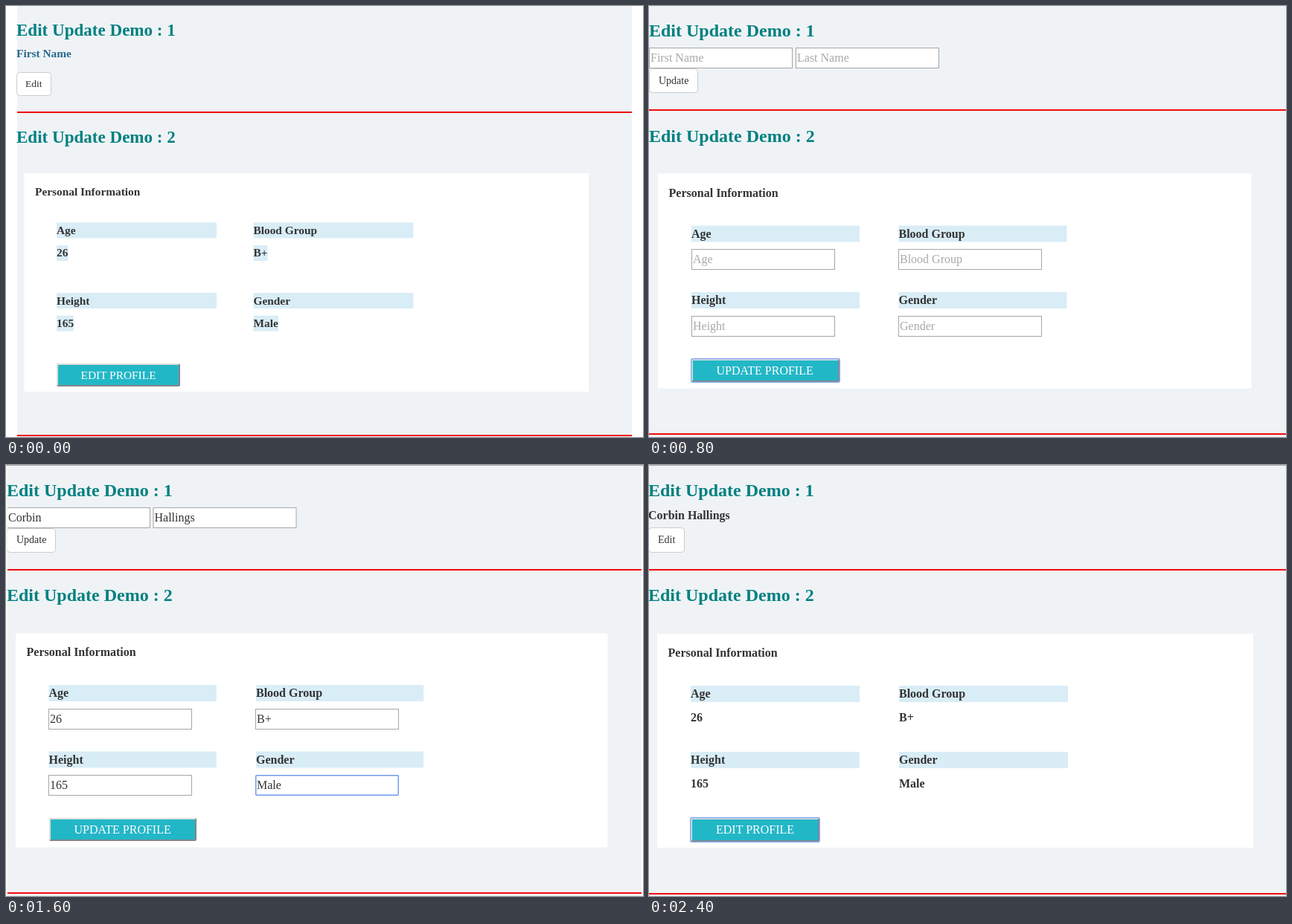
An HTML page for the animation above (3.2 s loop, 856 px wide and 580 px high).

```html
<!DOCTYPE html>
<html lang="en">
<head>
<meta charset="utf-8">
<title>Edit and update demo</title>
<style>
  html, body { margin: 0; width: 100%; height: 100%; overflow: hidden; background: #fff; }
  svg { display: block; width: 856px; height: 580px; font-family: "Liberation Serif", "Times New Roman", serif; }
  text { fill: #333; white-space: pre; }
  .b { font-weight: bold; }
  .head { font-weight: bold; fill: teal; }
  .name { font-weight: bold; fill: #286a8e; }
  .hint { fill: #a9a9a9; }
  .light { fill: #fff; }
  .scene {
    visibility: hidden;
    animation: show 3200ms step-end infinite;
    animation-delay: calc(var(--i) * 800ms - 3200ms);
  }
  @keyframes show {
    0% { visibility: visible; }
    25%, 100% { visibility: hidden; }
  }
</style>
</head>
<body>
<svg id="stage" viewBox="0 0 856 580"></svg>
<script>
const BG = '#eff3f6', BAR = '#d9edf7', RED = '#f10a0f';
const FIRST = 'Corbin', LAST = 'Hallings';
const LABELS = ['Age', 'Blood Group', 'Height', 'Gender'];
const VALUES = ['26', 'B+', '165', 'Male'];

const rect = (x, y, w, h, fill, extra = '') =>
  `<rect x="${x}" y="${y}" width="${w}" height="${h}" fill="${fill}" ${extra}/>`;
const text = (x, y, str, size = 16, cls = '') =>
  `<text x="${x}" y="${y}" font-size="${size}" class="${cls}">${str}</text>`;
const outline = (x, y, w, h, color, r = 0) =>
  rect(x + .5, y + .5, w - 1, h - 1, '#fff', `stroke="${color}" rx="${r}"`);

function input(x, y, str, cls, w = 193, focused) {
  const ring = focused ? rect(x + .75, y + .75, w - 1.5, 26.5, '#fff', 'stroke="#6f9bea" stroke-width="1.5" rx="1"')
                       : outline(x, y, w, 28, '#a6a6a6');
  return ring + text(x + 2, y + 19, str, 16, cls);
}

// Raised button with lit top-left and shaded bottom-right edges
function button(x, y, w, h, str, tx, size, focused) {
  const r = x + w, b = y + h;
  return rect(x, y, w, h, '#858585', 'rx="2"') +
    `<path d="M${x} ${b - 1}V${y + 1}Q${x} ${y} ${x + 1} ${y}H${r - 1}L${r - 2} ${y + 2}H${x + 2}V${b - 2}Z" fill="#dedede"/>` +
    rect(x + 2, y + 2, w - 4, h - 4, '#22b7c7') +
    (focused ? rect(x - .25, y - .25, w + .5, h + .5, 'none', 'stroke="#84a9ee" stroke-width="1.5" rx="2"') : '') +
    text(tx, y + h / 2 + 5.2, str, size, 'light');
}

function page(s, i) {
  const k = s.k || 1, size = 16 * k;
  const [cx, cy, cw, ch] = s.card;
  let out = rect(s.left, 0, s.right - s.left, 580, BG);
  if (s.topLine) out += rect(0, 0, 856, 1, '#a4a8aa');
  out += text(s.x, s.head[0], 'Edit Update Demo : 1', 24 * k, 'head') +
         text(s.x, s.head[1], 'Edit Update Demo : 2', 24 * k, 'head') +
         s.top();
  for (const y of s.lines) out += rect(s.left, y, s.right - s.left, 2, RED);
  out += rect(cx, cy, cw, ch, '#fff') +
         text(cx + 14.6, s.title, 'Personal Information', size, 'b');
  LABELS.forEach((label, n) => {
    const x = s.cols[n % 2], y = s.rows[n >> 1];
    out += rect(x, y, s.barW, s.barH, BAR) +
           text(x, y + s.barH / 2 + 5.4, label, size, 'b') +
           s.field(x, y, n);
  });
  out += button(...s.button);
  return `<g class="scene" style="--i:${i}"><clipPath id="c${i}">` +
    rect(s.clip ?? s.left, 0, 856, 580, '#000') + `</clipPath><g clip-path="url(#c${i})">${out}</g></g>`;
}

const scenes = [
  {
    k: .961, left: 15, right: 841, clip: 14, x: 14, head: [40, 184], lines: [142, 577],
    top: () => text(14, 69, 'First Name', 15.4, 'name') +
      outline(14, 89, 47, 32, '#ccc', 4) + text(26, 109, 'Edit', 13.5),
    card: [24.5, 225, 758.5, 294], title: 255.3,
    cols: [68, 332.5], rows: [291.4, 386], barW: 215, barH: 21,
    field: (x, y, n) => rect(x, y + 30.6, [15.4, 19, 23, 33.5][n], 21, BAR) +
      text(x, y + 46, VALUES[n], 15.4, 'b'),
    button: [68, 481, 166, 31, 'EDIT PROFILE', 100.5, 15.4]
  },
  {
    left: 0, right: 856, x: 0, head: [41, 182.5], lines: [139, 575],
    top: () => input(0, 56, 'First Name', 'hint') + input(197, 56, 'Last Name', 'hint') +
      outline(0, 84, 66, 33, '#ccc', 4) + text(13, 104.5, 'Update', 14),
    card: [12, 225.5, 797.5, 289], title: 256.8,
    cols: [57, 335.5], rows: [295.5, 385], barW: 226, barH: 22,
    field: (x, y, n) => input(Math.floor(x), Math.floor(y + 32), LABELS[n], 'hint'),
    button: [57, 475, 199, 31, 'UPDATE PROFILE', 90.5, 16, true]
  },
  {
    left: 2, right: 854, clip: 0, x: 1, head: [42, 183], lines: [140, 575], topLine: true,
    top: () => input(1, 57, FIRST, '') + input(197.5, 57, LAST, '') +
      outline(1, 85, 66, 33, '#ccc', 4) + text(14, 105.2, 'Update', 14) +
      rect(0, 1, 2, 579, '#f6f9f2'),
    card: [13, 226.5, 795.5, 288], title: 257.3,
    cols: [57.5, 336], rows: [296, 385.5], barW: 225.3, barH: 22,
    field: (x, y, n) => input(Math.floor(x - .5), Math.floor(y + 32), VALUES[n], '', 193, n === 3),
    button: [58, 475, 198, 31, 'UPDATE PROFILE', 91.5, 16]
  },
  {
    left: 0, right: 856, x: -1, head: [42, 183], lines: [140, 576], topLine: true,
    top: () => text(-1, 73, FIRST + ' ' + LAST, 16, 'b') +
      outline(-1, 84, 49, 34, '#ccc', 4) + text(12, 105.2, 'Edit', 14),
    card: [11, 227, 801, 288], title: 258,
    cols: [56, 336], rows: [297, 386], barW: 227, barH: 22,
    field: (x, y, n) => text(x, y + 48, VALUES[n], 16, 'b'),
    button: [56, 475, 173, 32, 'EDIT PROFILE', 90, 16, true]
  }
];

document.getElementById('stage').innerHTML = scenes.map(page).join('');
</script>
</body>
</html>
```
